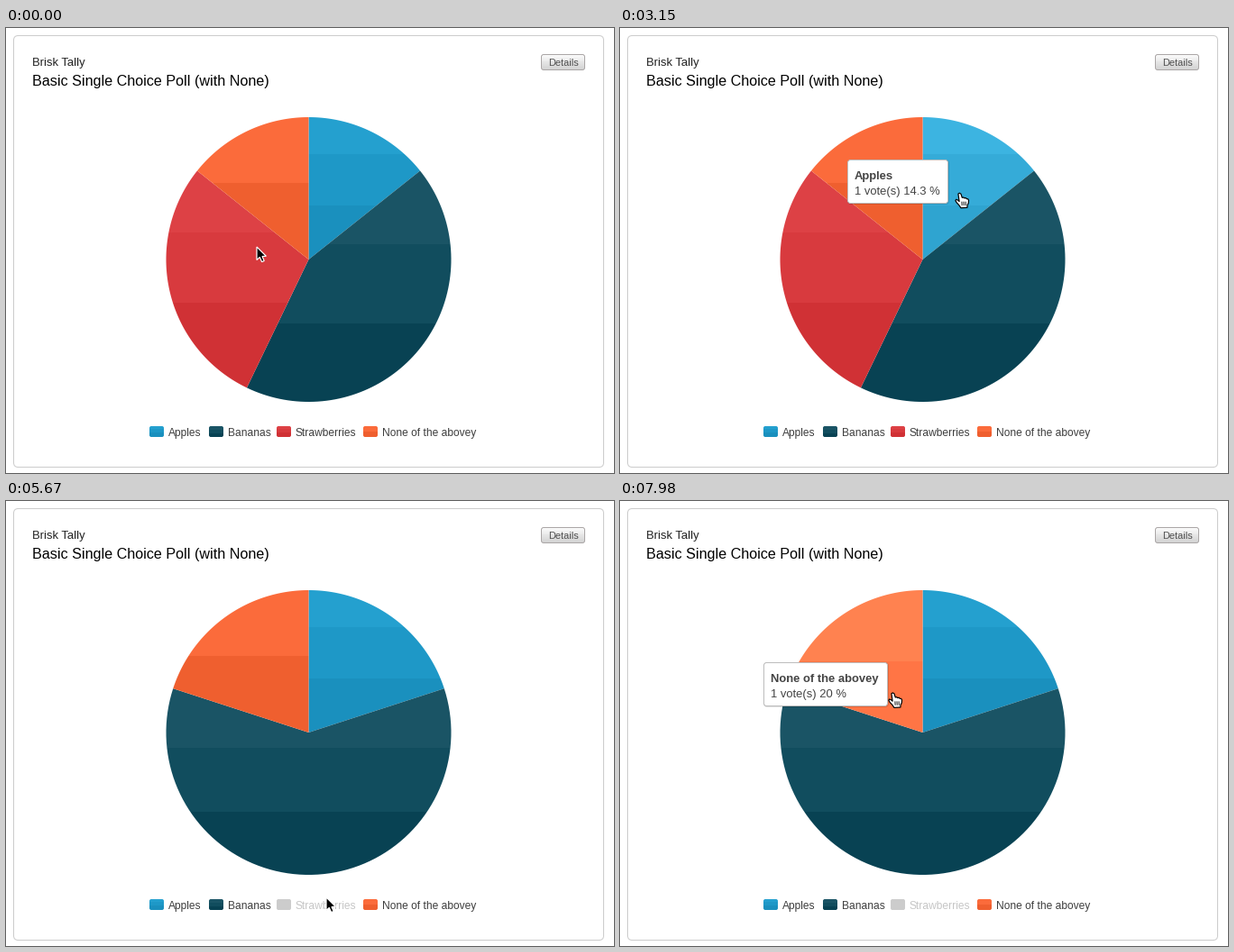
Animation of 674x494 px, one loop 8 s. Source, as a matplotlib script:

```python
import numpy as np
import matplotlib.pyplot as plt
from matplotlib.animation import FuncAnimation
from matplotlib.colors import to_rgb
from matplotlib.patches import FancyBboxPatch, Polygon
from matplotlib.path import Path

W, H, DPI = 674, 494, 100
INTERVAL, FRAMES, STEP = 40, 200, 70
CENTER, RADIUS = np.array([335.5, 257.0]), 158
CLICK, MORPH = 5110, 490
FADE_START, FADE = 4690, 420

NAMES = ["Apples", "Bananas", "Strawberries", "None of the abovey"]
VOTES = np.array([1, 3, 2, 1])
HIDDEN = 2
LEGEND_X = [159, 225, 300, 396]
# Stepped vertical shades: colours and the heights where they change
SHADES = [
    (["#24a0cf", "#1e98c7", "#1a90be"], [.26, .62]),
    (["#1a5465", "#114d5e", "#084253"], [.32, .66]),
    (["#dd4145", "#d83a3e", "#d03135"], [.29, .61]),
    (["#fb6b3b", "#ef5f2f"], [.46]),
]
HOVER_SHADES = [
    (["#3cb4e1", "#35abd8", "#2fa4d0"], [.26, .62]),
    (["#2d687b", "#225d6e"], [.52]),
    (["#f9595c", "#ef5154", "#e74a4c"], [.35, .58]),
    (["#ff8250", "#ff7545"], [.5]),
]

# Pointer path: time, x, y
POINTER = np.array([
    (0, 278, 243), (700, 253, 258), (840, 253, 258), (980, 252, 243),
    (1050, 251.5, 248), (1190, 251.5, 248), (1890, 325.5, 187),
    (2380, 325.5, 187), (2800, 375, 172), (3080, 375, 172),
    (3500, 384, 240), (3780, 385, 262), (3920, 386, 272), (3990, 386, 272),
    (4410, 357, 398), (4480, 356, 440), (4550, 353, 474),
    (4760, 354.5, 452), (5320, 354.5, 452), (5600, 355, 440),
    (5670, 355, 440), (6090, 349, 300), (6370, 341, 349), (6580, 341, 349),
    (6790, 351.5, 286), (7140, 372, 190), (7420, 372, 205),
    (7980, 302.5, 213),
])

ARROW = [(0, 0), (0, 14.5), (3.3, 11.4), (5.6, 16.6), (8.2, 15.5),
         (6, 10.5), (10.4, 10.3)]
HAND = [(-1.6, .8), (-.2, -.1), (1.4, .8), (2.8, 5), (4.2, 4.6), (5.3, 5.6),
        (6.8, 5.2), (7.8, 6.4), (9.2, 6.4), (10, 7.8), (9.8, 11), (8.6, 13.4),
        (8.4, 16), (1.4, 16.4), (-.6, 13.4), (-3.4, 10.4), (-4.6, 8.2),
        (-3.8, 7), (-2.2, 7.6), (-.4, 9.2)]

fig = plt.figure(figsize=(W / DPI, H / DPI), dpi=DPI, facecolor="white")
ax = fig.add_axes([0, 0, 1, 1])
ax.set_xlim(0, W)
ax.set_ylim(H, 0)
ax.axis("off")


def px(size):
    return size * 72 / DPI


def label(x, y, text, size, color, **kw):
    kw = {"zorder": 4, **kw}
    return ax.text(x, y, text, fontsize=px(size), color=color,
                   family="Liberation Sans", va="baseline", **kw)


def rounded(x, y, w, h, r, **kw):
    box = FancyBboxPatch((x, y), w, h, **kw,
                         boxstyle=f"round,pad=0,rounding_size={r}")
    return ax.add_patch(box)


def banded(shade):
    colors, breaks = shade
    rows = np.searchsorted(breaks, np.linspace(0, 1, 200))
    return np.array([to_rgb(c) for c in colors])[rows][:, None, :]


def shaded(data, x, y, w, h, zorder=2):
    return ax.imshow(data, extent=(x, x + w, y + h, y), aspect="auto",
                     interpolation="nearest", zorder=zorder)


def shaded_box(data, x, y, w, h, r):
    clip = rounded(x, y, w, h, r, fc="none", ec="none")
    image = shaded(data, x, y, w, h)
    image.set_clip_path(clip)
    return image


def bounds(t):
    """Start and end of every slice as fractions of a turn."""
    before = np.cumsum(np.r_[0, VOTES]) / VOTES.sum()
    kept = np.where(np.arange(4) == HIDDEN, 0, VOTES)
    after = np.cumsum(np.r_[0, kept]) / kept.sum()
    u = np.clip((t - CLICK) / MORPH, 0, 1)
    mix = before + (after - before) * (.5 - np.cos(np.pi * u) / 2)
    starts, ends = mix[:-1].copy(), mix[1:].copy()
    if t >= CLICK:
        ends[1] = before[2] + (after[2] - before[2]) * (.5 - np.cos(np.pi * u) / 2)
        starts[3] = before[3] + (after[3] - before[3]) * (.5 - np.cos(np.pi * u) / 2)
    return starts, ends


def slice_points(start, end):
    a = np.linspace(start, end, 90) * 2 * np.pi
    arc = CENTER + RADIUS * np.c_[np.sin(a), -np.cos(a)]
    return np.vstack([CENTER, arc, CENTER])


def slice_at(pos, t):
    dx, dy = pos - CENTER
    if t < STEP or np.hypot(dx, dy) > RADIUS:
        return None
    turn = np.arctan2(dx, -dy) / (2 * np.pi) % 1
    for i, (start, end) in enumerate(zip(*bounds(t))):
        if start <= turn < end and not (i == HIDDEN and t >= CLICK):
            return i
    return None


def vote_text(i, t):
    total = VOTES.sum() - (VOTES[HIDDEN] if t >= CLICK else 0)
    return f"{VOTES[i]} vote(s) {round(100 * VOTES[i] / total, 1):g} %"


def tip_width(i, t):
    return 138 if i == 3 else 101 if t >= CLICK else 112


def build_states():
    """Pointer, hover and trailing tooltip for each time step."""
    states, tip, target, shown = [], None, None, None
    for t in range(0, INTERVAL * FRAMES, STEP):
        pos = np.array([np.interp(t, POINTER[:, 0], POINTER[:, k])
                        for k in (1, 2)])
        over = slice_at(pos, t)
        alpha = 1.0
        if over is not None:
            target = pos - (12 + tip_width(over, t), 33)
            shown = (NAMES[over], vote_text(over, t), tip_width(over, t))
        elif shown:
            alpha = np.clip(1 - (t - FADE_START) / FADE, 0, 1)
            if alpha == 0:
                tip = shown = None
        if shown:
            tip = target if tip is None else tip + (target - tip) * .62
        on_legend = 300 <= pos[0] <= 390 and 440.5 <= pos[1] <= 460
        states.append((t, pos, over, on_legend, tip, shown, alpha))
    return states


STATES = build_states()

# Card, headings and button
rounded(8.5, 8.5, 654, 479, 5, fc="white", ec="#cccccc", lw=px(1))
label(29, 42, "Brisk Tally", 13, "#222222")
label(29, 64, "Basic Single Choice Poll (with None)", 16.1, "black")
grey = np.linspace(.99, .83, 18)[:, None, None] * np.ones(3)
shaded_box(grey, 593.5, 29.5, 48, 17, 2.5)
rounded(593.5, 29.5, 48, 17, 2.5, fc="none", ec="#aaa6a6", lw=px(1), zorder=3)
label(617.5, 42, "Details", 11, "#505050", ha="center")

# Pie and legend
slices = [shaded(banded(s), 0, 0, 1, 1) for s in SHADES]
swatches = [shaded_box(banded(s), x, 442, 16, 12, 2)
            for s, x in zip(SHADES, LEGEND_X)]
legend = [label(x + 21, 453, name, 12, "#3e3e3e")
          for name, x in zip(NAMES, LEGEND_X)]
NORMAL = [banded(s) for s in SHADES]
BRIGHT = [banded(s) for s in HOVER_SHADES]
OFF = np.full((1, 1, 3), .8)

# Tooltip
shadow = rounded(0, 0, 1, 1, 3, fc="none", ec="black", lw=px(2), zorder=5)
frame = rounded(0, 0, 1, 1, 3, fc="white", ec="#bdbdbd", lw=px(1), zorder=6)
heading = label(0, 0, "", 13, "#444444", weight="bold", zorder=7)
detail = label(0, 0, "", 13, "#444444", zorder=7)
tooltip = [shadow, frame, heading, detail]

# Pointers
arrow = ax.add_patch(Polygon(ARROW, fc="black", ec="white", lw=px(1.2),
                             zorder=9))
hand = ax.add_patch(Polygon(HAND, fc="white", ec="black", lw=px(1.2),
                            joinstyle="round", zorder=9))
knuckles = [ax.plot([], [], color="black", lw=px(.9), zorder=10)[0]
            for _ in range(3)]


def draw_pie(t, lit):
    for i, (start, end) in enumerate(zip(*bounds(t))):
        image = slices[i]
        image.set_visible(not (i == HIDDEN and t >= CLICK))
        if not image.get_visible():
            continue
        pts = slice_points(start, end)
        (x0, y0), (x1, y1) = pts.min(0), pts.max(0)
        image.set_data((BRIGHT if i == lit else NORMAL)[i])
        image.set_extent((x0 - 1, x1 + 1, y1 + 1, y0 - 1))
        image.set_clip_path(Path(pts), ax.transData)


def draw_tooltip(tip, shown, alpha):
    for part in tooltip:
        part.set_visible(shown is not None)
    if shown is None:
        return
    x, y = np.round(tip)
    name, votes, width = shown
    frame.set_bounds(x + .5, y + .5, width - 1, 48)
    shadow.set_bounds(x + 1, y + 1, width - 1, 48)
    heading.set_position((x + 8, y + 22))
    detail.set_position((x + 8, y + 39))
    heading.set_text(name)
    detail.set_text(votes)
    for part in (frame, heading, detail):
        part.set_alpha(alpha)
    shadow.set_alpha(.12 * alpha)


def draw_pointer(pos, pointing):
    arrow.set_visible(not pointing)
    hand.set_visible(pointing)
    arrow.set_xy(np.array(ARROW) + pos)
    hand.set_xy(np.array(HAND) + pos)
    for k, line in enumerate(knuckles):
        line.set_visible(pointing)
        line.set_data(pos[0] + 2.4 + 2.1 * k + np.array([0, .2]),
                      pos[1] + np.array([9.8, 13.2]))


def update(i):
    now = i * INTERVAL + INTERVAL - 1
    t, pos, over, on_legend, tip, shown, alpha = STATES[now // STEP]
    off = t >= CLICK
    lit = HIDDEN if on_legend and not off else over
    draw_pie(t, lit)
    swatches[HIDDEN].set_data(OFF if off else NORMAL[HIDDEN])
    legend[HIDDEN].set_color("#c6c6c6" if off else
                             "black" if on_legend else "#3e3e3e")
    draw_tooltip(tip, shown, alpha)
    draw_pointer(pos, over is not None or on_legend)
    return []


anim = FuncAnimation(fig, update, frames=FRAMES, interval=INTERVAL,
                     repeat=True, repeat_delay=0, blit=False)
plt.show()
```
